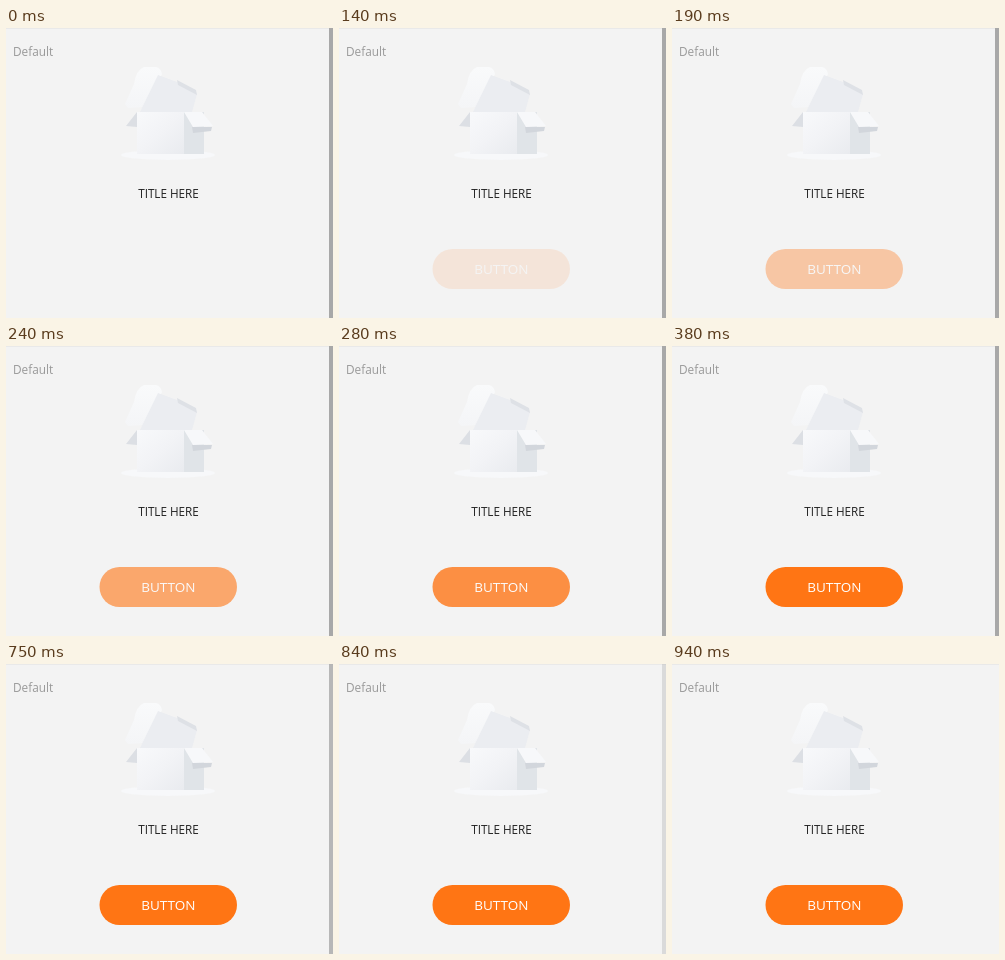
Recreate the animation shown at these times as an HTML page. Size 327 px wide and 290 px high, loop 1300 ms.

```html
<!DOCTYPE html>
<html>
<head>
<meta charset="utf-8">
<style>
  html, body { margin: 0; width: 100%; height: 100%; overflow: hidden; background: #f3f3f3; }
  svg { display: block; font-family: "Open Sans", sans-serif; }
</style>
</head>
<body>
<svg width="327" height="290" viewBox="0 0 327 290">
  <defs>
    <linearGradient id="front" x1="0" y1="0" x2="1" y2="1">
      <stop offset="0" stop-color="#f8f9fb"/>
      <stop offset=".5" stop-color="#f2f3f6"/>
      <stop offset="1" stop-color="#e9ebef"/>
    </linearGradient>
    <linearGradient id="sheet" x1="0" y1="0" x2="0" y2="1">
      <stop offset="0" stop-color="#f9fafb"/>
      <stop offset="1" stop-color="#f4f5f7"/>
    </linearGradient>
  </defs>
  <rect width="327" height="290" fill="#f3f3f3"/>
  <rect width="327" height="1" fill="#e9e9e9"/>
  <text x="7" y="28" font-size="11.8" fill="#999">Default</text>

  <!-- open box -->
  <ellipse cx="162" cy="127" rx="47" ry="5" fill="#f7f8fa"/>
  <path d="M138 39H150Q155 40 156 46L140 79 122 80 119 76 128 56Q130 42 138 39Z" fill="url(#sheet)"/>
  <path d="M152 47L171 54 191 66 186 84H134Z" fill="#ebedf1"/>
  <path d="M171 52L190 62 191 67 172 57Z" fill="#dee1e6"/>
  <path d="M131 84L120 98 131 99Z" fill="#dcdfe4"/>
  <path d="M131 84H178V126H131Z" fill="url(#front)"/>
  <path d="M178 84H198V126H178Z" fill="#e0e4e8"/>
  <path d="M186 99H206L205 103 187 105Z" fill="#d2d6dc"/>
  <path d="M178 84H196L207 98 187 99Z" fill="#f7f8fa"/>

  <text x="162.5" y="170" font-size="11.7" fill="#222" text-anchor="middle">TITLE HERE</text>
  <g id="button">
    <rect x="93.5" y="221" width="137.5" height="40" rx="20" fill="#ff7514"/>
    <text x="162.3" y="246" font-size="13.5" font-weight="500" fill="#fff" text-anchor="middle">BUTTON</text>
  </g>
  <rect id="bar" x="323" width="4" height="290" fill="#a8a8a8"/>
</svg>
<script>
  const button = document.getElementById('button');
  const bar = document.getElementById('bar');
  // [start ms, opacity]
  const buttonSteps = [[0, 0], [140, .11], [190, .35], [240, .6], [280, .79], [330, .92], [380, 1]];
  const barSteps = [[0, 1], [750, .79], [840, .35], [940, 0]];
  const valueAt = (steps, t) => steps.filter(([start]) => start <= t).pop()[1];

  let origin;
  function draw(now) {
    origin ??= now;
    const t = Math.max(0, now - origin) % 1300;
    button.setAttribute('opacity', valueAt(buttonSteps, t));
    bar.setAttribute('opacity', valueAt(barSteps, t));
    requestAnimationFrame(draw);
  }
  draw(performance.now());
</script>
</body>
</html>
```
